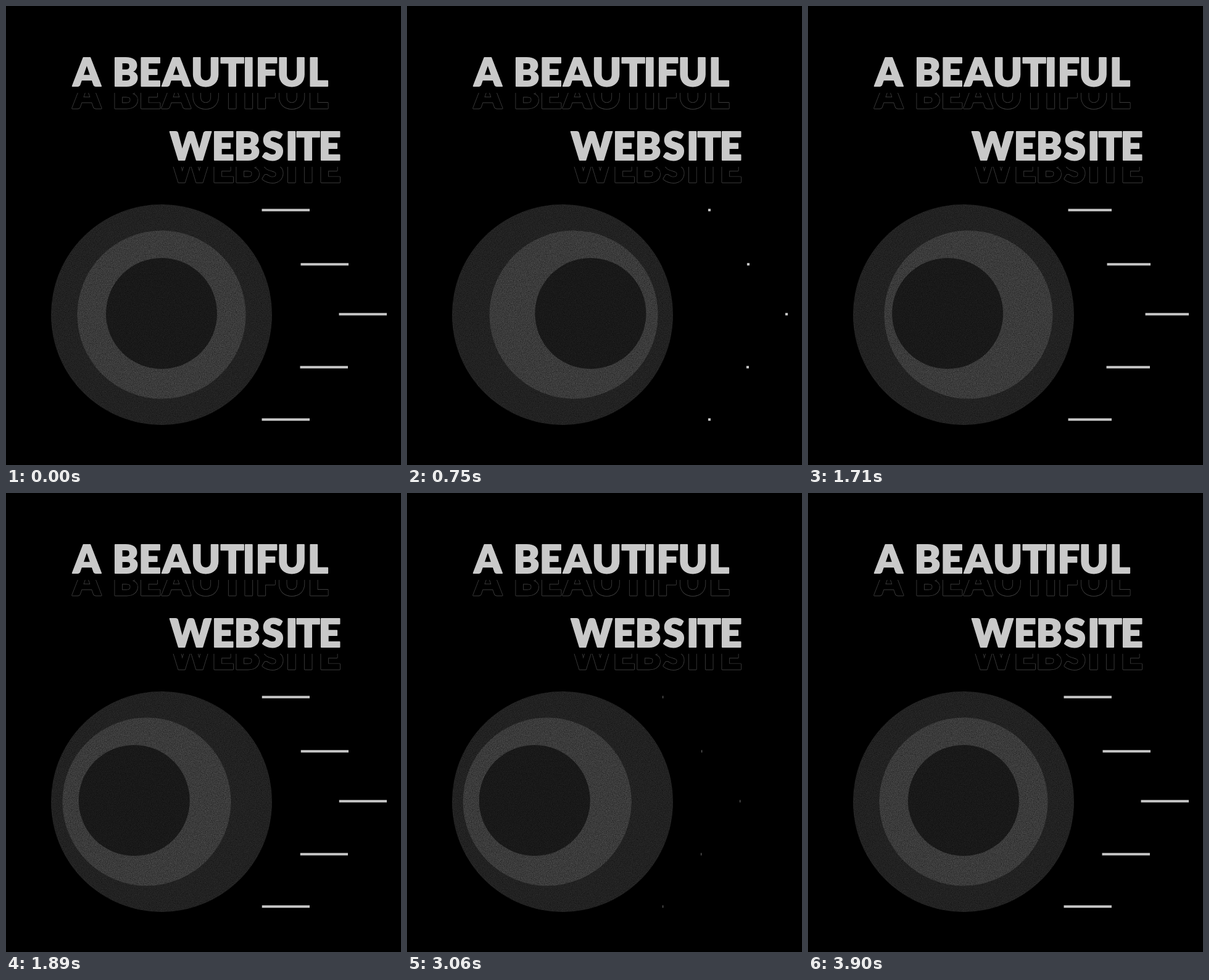
Recreate the animation shown at these times as an HTML page. Size 640 by 745 pixels, loop 3.96 s.

```html
<!DOCTYPE html>
<html lang="en">
<head>
<meta charset="utf-8">
<title>A beautiful website</title>
<style>
  html, body { margin: 0; width: 100%; height: 100%; overflow: hidden; background: #000; }
  svg { display: block; width: 100vw; height: 100vh; }
  text { font: 900 63px Lato, "Open Sans", sans-serif; stroke-linejoin: round; white-space: pre; }
  .solid { fill: #c9c9c9; stroke: #c9c9c9; stroke-width: 2; }
  .rim { fill: #3c3c3c; stroke: #3c3c3c; stroke-width: 2.9; }
  .hollow { fill: #000; stroke: #000; stroke-width: 1.1; }
  #lines line { stroke: #c6c6c6; stroke-width: 4; }
</style>
</head>
<body>
<svg viewBox="0 0 640 745" xmlns="http://www.w3.org/2000/svg">
  <defs>
    <filter id="grain" x="0" y="0" width="1" height="1" color-interpolation-filters="sRGB">
      <feTurbulence type="fractalNoise" baseFrequency="0.9" numOctaves="2" seed="4"/>
      <feColorMatrix values="0 0 0 0 0  0 0 0 0 0  0 0 0 0 0  0 0 0 1 -0.3"/>
    </filter>
    <clipPath id="disc"><circle cx="252" cy="501" r="179"/></clipPath>
    <clipPath id="lower">
      <rect x="90" y="141" width="460" height="40"/>
      <rect x="90" y="261" width="460" height="40"/>
    </clipPath>
  </defs>
  <g id="echo" clip-path="url(#lower)"></g>
  <g id="title"></g>
  <circle cx="252" cy="501" r="179" fill="#2a2a2a"/>
  <circle id="ring" cx="252" cy="501" r="136.5" fill="#4a4a4a"/>
  <circle id="core" cx="252" cy="499" r="90" fill="#1f1f1f"/>
  <g clip-path="url(#disc)"><rect x="73" y="322" width="358" height="358" filter="url(#grain)"/></g>
  <g id="lines"></g>
</svg>
<script>
const LOOP = 3960, STEP = 30, LENGTH = 77.5;
const $ = id => document.getElementById(id);

function add(parent, tag, attrs, text) {
  const el = document.createElementNS("http://www.w3.org/2000/svg", tag);
  for (const k in attrs) el.setAttribute(k, attrs[k]);
  if (text) el.textContent = text;
  return parent.appendChild(el);
}

// Place each glyph so that its ink is centred on the given x.
const pen = document.createElement("canvas").getContext("2d");
pen.font = '900 63px Lato, "Open Sans", sans-serif';
function inkOrigins(word, centres) {
  return [...word].map((ch, i) => {
    const m = pen.measureText(ch);
    const mid = (m.actualBoundingBoxRight - m.actualBoundingBoxLeft) / 2;
    return (centres[i] - (ch === " " ? 0 : mid)).toFixed(2);
  }).join(" ");
}

const words = [
  ["A BEAUTIFUL", 130, [131, 160, 194.5, 234, 276, 323.5, 366.5, 393.5, 423.5, 463, 507.5]],
  ["WEBSITE", 249.5, [299, 352.5, 391.5, 432, 463, 489.5, 525.5]]
];
for (const [word, y, centres] of words) {
  const x = inkOrigins(word, centres);
  add($("title"), "text", { x, y, class: "solid" }, word);
  for (const layer of ["rim", "hollow"]) {
    add($("echo"), "text", { x, y: y + 36, class: layer, "aria-hidden": true }, word);
  }
}

const bars = [[414.5, 331.2], [477.5, 419.2], [539.5, 500.2], [476.5, 586.2], [414.5, 671.2]]
  .map(([x, y]) => ({ x, el: add($("lines"), "line", { y1: y, y2: y }) }));

// Cubic bezier ease with handles (a, 0) and (b, 1).
function ease(x, a, b) {
  if (x <= 0) return 0;
  if (x >= 1) return 1;
  let lo = 0, hi = 1, u;
  for (let i = 0; i < 24; i++) {
    u = (lo + hi) / 2;
    const v = 1 - u;
    if (3 * v * v * u * a + 3 * v * u * u * b + u * u * u < x) lo = u; else hi = u;
  }
  return u * u * (3 - 2 * u);
}

// Moves are [start, end, target, a, b].
function track(t, value, moves) {
  for (const [start, end, target, a, b] of moves) {
    value += (target - value) * ease((t - start) / (end - start), a, b);
  }
  return value;
}

const coreMoves = [[20, 790, 45.5, .6, .4], [1230, 1950, -45.3, .47, .53], [3180, 3870, 0, .5, .31]];
const ringMoves = [[495, 885, 22.2, .6, .4], [1548, 1938, -24.8, .6, .4], [3180, 3900, 0, .5, .31]];
const headMoves = [[0, 895, 1, .865, .508], [1062, 1940, 0, .6, .4]];
const tailMoves = [[2112, 3070, .008, .42, 0], [3125, 3915, 1, .7, .56]];

function draw(t) {
  $("core").setAttribute("cx", 252 + track(t, 0, coreMoves));
  $("ring").setAttribute("cx", 252 + track(t, 0, ringMoves));
  const head = LENGTH * track(t, 0, headMoves);
  const tail = LENGTH * track(t, 1, tailMoves);
  for (const { x, el } of bars) {
    el.setAttribute("x1", x + head);
    el.setAttribute("x2", x + tail);
  }
}

const began = performance.now();
function tick() {
  const t = (performance.now() - began) % LOOP;
  draw(Math.floor(t / STEP) * STEP);
  requestAnimationFrame(tick);
}
tick();
</script>
</body>
</html>
```
